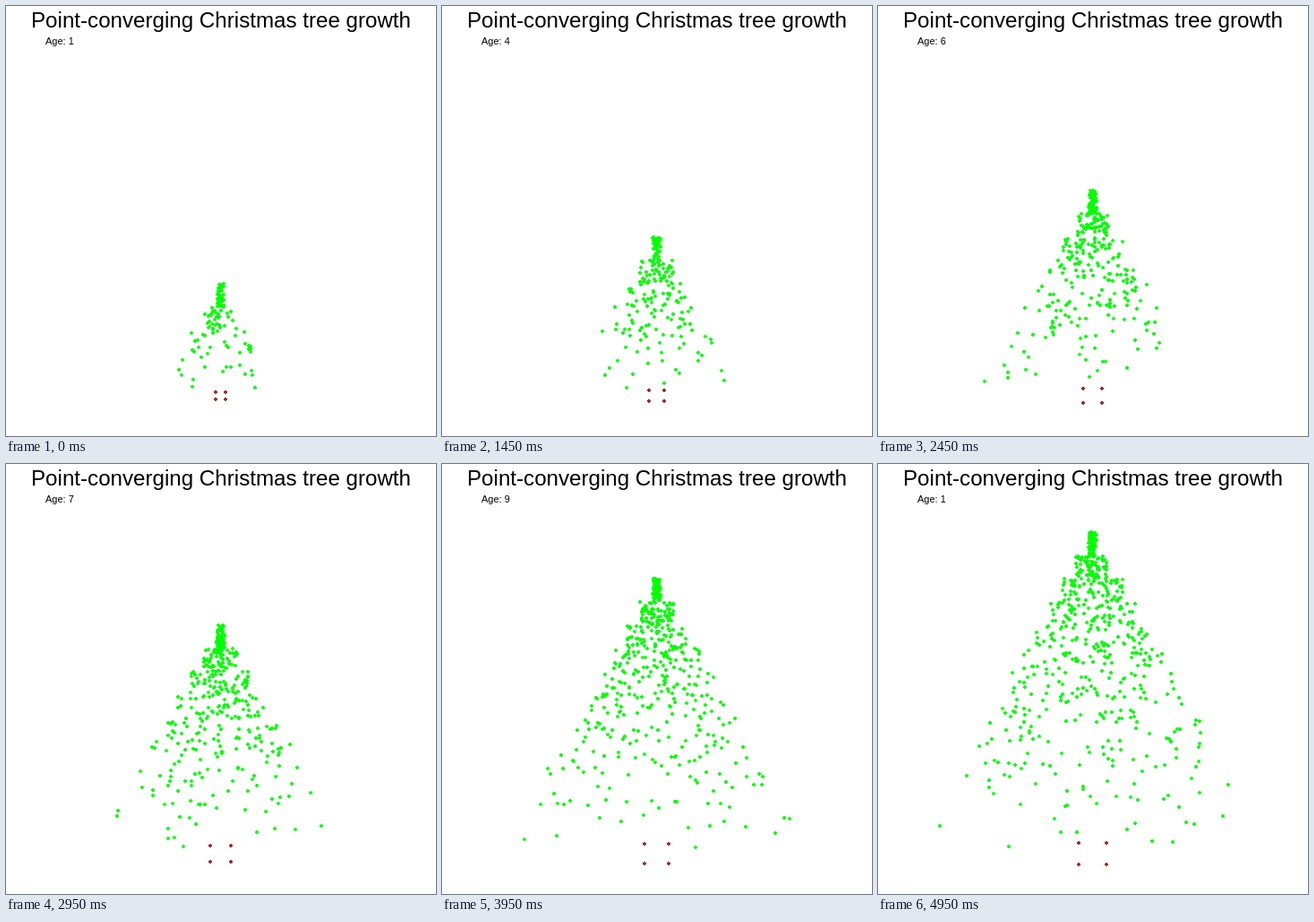
Write an HTML page that moves like this. It is 480x480 px and loops after 5 s.

```html
<!DOCTYPE html>
<html lang="en">
<head>
<meta charset="utf-8">
<title>Christmas tree growth</title>
<style>
  html, body { margin: 0; width: 100%; height: 100%; overflow: hidden; background: #fff; }
  svg { display: block; width: 100vw; height: 100vh; }
  text { font-family: "Liberation Sans", Arial, sans-serif; fill: #000; }
  path { shape-rendering: crispEdges; }
</style>
</head>
<body>
<svg viewBox="0 0 480 480">
  <text x="240" y="24" font-size="24.15" text-anchor="middle">Point-converging Christmas tree growth</text>
  <text id="label" x="44" y="43" font-size="11"></text>
  <path id="needles" fill="#00ff00"/>
  <path id="trunk" fill="#a52a2a"/>
</svg>
<script>
const AGES = 10, STEP = 500, LEAD = 50;
const CENTER = 239.5, LAYER = 25.9, LOWEST = 428;
const [label, needles, trunk] = ["label", "needles", "trunk"].map(id => document.getElementById(id));

function random(seed) {
  return () => {
    seed = (seed + 0x6D2B79F5) | 0;
    let n = Math.imul(seed ^ (seed >>> 15), 1 | seed);
    n = (n + Math.imul(n ^ (n >>> 7), 61 | n)) ^ n;
    return ((n ^ (n >>> 14)) >>> 0) / 4294967296;
  };
}

// A 4 px dot without its corners
function dot(x, y) {
  return `M${Math.round(x) - 1} ${Math.round(y) - 2}h2v1h1v2h-1v1h-2v-1h-1v-2h1z`;
}

// Every layer is wider and holds fewer points than the one above
function treePath(age) {
  const rnd = random(age * 97);
  const layers = age + 4;
  const top = 309.5 - LAYER * (age - 1);
  const density = 10 - 0.45 * (age - 1);
  let d = "";
  for (let i = 0; i < layers; i++) {
    const y = top + i * LAYER;
    const height = Math.min(LAYER, LOWEST - y);
    const half = 4.3 + 14.7 * i;
    const count = Math.round(3 + density * (layers - 1 - i));
    for (let k = 0; k < count; k++) {
      d += dot(CENTER + half * (2 * rnd() - 1), y + height * rnd());
    }
  }
  return d;
}

function trunkPath(age) {
  const w = 5.9 + 1.08 * (age - 1), h = 4.22 + 0.9 * (age - 1);
  return [-1, 1].map(sx => [-1, 1].map(sy => dot(CENTER + sx * w, 435 + sy * h)).join("")).join("");
}

const trees = Array.from({ length: AGES }, (_, i) => ({ needles: treePath(i + 1), trunk: trunkPath(i + 1) }));
let shown = -1;

// The label turns over shortly before the tree does
function render(time) {
  const t = time % (AGES * STEP);
  const stage = Math.floor(t / STEP);
  label.textContent = "Age: " + (Math.floor((t + LEAD) / STEP) % AGES + 1);
  if (stage === shown) return;
  shown = stage;
  needles.setAttribute("d", trees[stage].needles);
  trunk.setAttribute("d", trees[stage].trunk);
}

const start = performance.now();
function tick() {
  render(performance.now() - start);
  requestAnimationFrame(tick);
}
tick();
</script>
</body>
</html>
```
